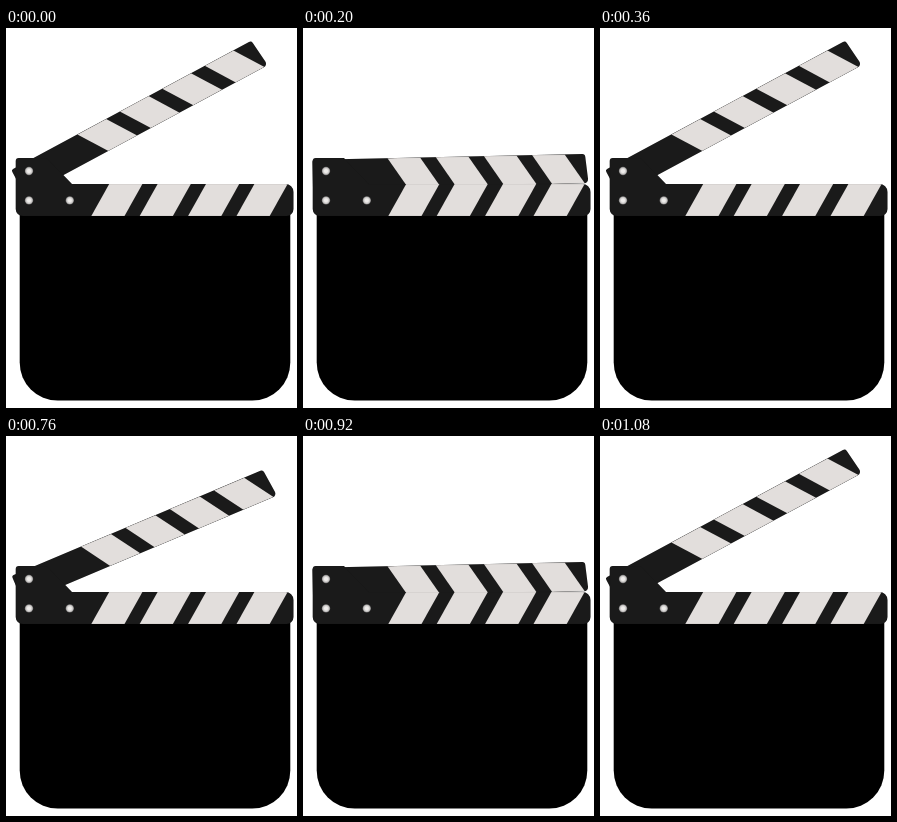
These frames come from a looping animation (291 by 380 pixels, 1400 ms). An HTML page with a canvas:

```html
<!DOCTYPE html>
<html lang="en">
<head>
<meta charset="utf-8">
<title>Clapperboard</title>
<style>
  html, body { margin: 0; width: 100%; height: 100%; overflow: hidden; background: #fff; }
  canvas { display: block; width: 291px; height: 380px; }
</style>
</head>
<body>
<canvas id="stage"></canvas>
<script>
const W = 291, H = 380, LOOP = 1400, STEP = 40;
const DARK = '#1a1a1a', LIGHT = '#e2dedc';
const PIVOT = { x: 28.7, y: 145.4 };
const CLOSED = 1.2, SWING = 27.1; // degrees
const CLAPS = [0, 720];
const DOWN = 5, UP = 4; // steps spent closing and opening

const canvas = document.getElementById('stage');
const ctx = canvas.getContext('2d');
const ratio = window.devicePixelRatio || 1;
canvas.width = Math.round(W * ratio);
canvas.height = Math.round(H * ratio);

// Closed path through [x, y, corner radius] points
function roundedPoly(points) {
  const path = new Path2D();
  const last = points[points.length - 1], first = points[0];
  path.moveTo((last[0] + first[0]) / 2, (last[1] + first[1]) / 2);
  points.forEach(([x, y, r], i) => {
    const next = points[(i + 1) % points.length];
    path.arcTo(x, y, (x + next[0]) / 2, (y + next[1]) / 2, r);
  });
  path.closePath();
  return path;
}

const arm = roundedPoly([
  [-19, -14.1, 2], [253.6, -14.1, 3], [256.6, 15.2, 4], [-19, 15.2, 2]
]);
const base = roundedPoly([
  [9.7, 130, 3], [41, 130, 0], [66, 156, 0], [287.5, 156, 8], [287.5, 188, 7], [9.7, 188, 7]
]);
const slate = new Path2D();
slate.roundRect(13.7, 184, 270.6, 188.6, [0, 0, 38, 38]);

function drawBar(shape, stripes) {
  ctx.fillStyle = DARK;
  ctx.fill(shape);
  ctx.save();
  ctx.clip(shape);
  ctx.fillStyle = LIGHT;
  const { top, bottom, topX, bottomX, width, pitch } = stripes;
  for (let i = 0; i < 4; i++) {
    const shift = i * pitch;
    ctx.beginPath();
    ctx.moveTo(topX + shift, top);
    ctx.lineTo(topX + shift + width, top);
    ctx.lineTo(bottomX + shift + width, bottom);
    ctx.lineTo(bottomX + shift, bottom);
    ctx.fill();
  }
  ctx.strokeStyle = 'rgba(0, 0, 0, 0.1)';
  ctx.lineWidth = 1.2;
  ctx.stroke(shape);
  ctx.restore();
}

function drawScrew(x, y) {
  const shade = ctx.createRadialGradient(x, y, 1.5, x, y, 4.2);
  shade.addColorStop(0, '#eeecea');
  shade.addColorStop(0.6, '#c4c2c1');
  shade.addColorStop(1, '#6a6969');
  ctx.beginPath();
  ctx.arc(x, y, 4.2, 0, Math.PI * 2);
  ctx.fillStyle = shade;
  ctx.fill();
}

// 1 is fully open, 0 is shut
function openness(time) {
  for (const start of CLAPS) {
    const step = Math.floor((time - start) / STEP);
    if (step >= 0 && step < DOWN + UP) {
      return step <= DOWN ? 1 - step / DOWN : (step - DOWN) / UP;
    }
  }
  return 1;
}

function draw(time) {
  ctx.setTransform(ratio, 0, 0, ratio, 0, 0);
  ctx.fillStyle = '#fff';
  ctx.fillRect(0, 0, W, H);

  ctx.fillStyle = '#000';
  ctx.fill(slate);

  ctx.save();
  ctx.translate(PIVOT.x, PIVOT.y);
  ctx.rotate(-(CLOSED + SWING * openness(time)) * Math.PI / 180);
  drawBar(arm, { top: -14.1, bottom: 15.2, topX: 56.1, bottomX: 75.6, width: 32.6, pitch: 48.2 });
  ctx.restore();

  drawBar(base, { top: 156, bottom: 188, topX: 103.2, bottomX: 85.3, width: 33.2, pitch: 48.4 });

  drawScrew(23, 143);
  drawScrew(23, 172.4);
  drawScrew(63.8, 172.4);
}

const begin = performance.now();
function tick() {
  draw((performance.now() - begin) % LOOP);
  requestAnimationFrame(tick);
}
tick();
</script>
</body>
</html>
```
